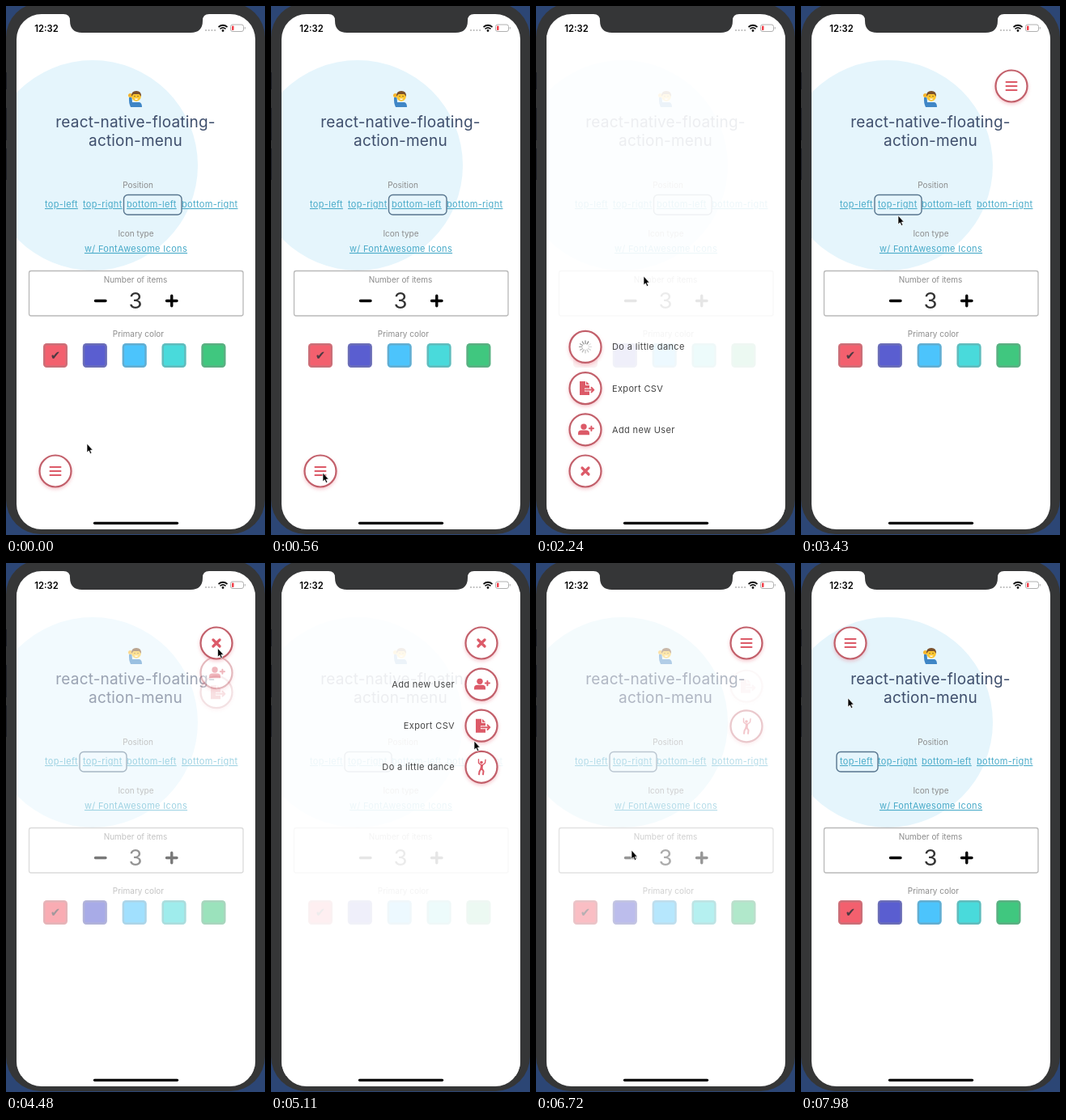
These frames come from a looping animation (320 px wide and 654 px high, 8000 ms). An HTML page:

```html
<!DOCTYPE html>
<html lang="en">
<head>
<meta charset="utf-8">
<title>Floating action menu</title>
<style>
html, body { margin: 0; width: 100%; height: 100%; overflow: hidden; background: #2c4675; }
svg { display: block; width: 100%; height: 100%; font-family: Inter, Roboto, sans-serif; }
.mid { text-anchor: middle; }
.cap { font-size: 10px; fill: #8c8c8c; }
.link { font-size: 11px; letter-spacing: .33px; fill: #4aabc9; text-decoration: underline; }
.label { font-size: 11px; letter-spacing: .35px; fill: #444; }
.title { font-size: 19px; letter-spacing: .18px; fill: #3e4e6c; }
.disc { fill: #fff; stroke: #c25f6a; stroke-width: 2.2; filter: drop-shadow(0 2px 2px #e8788866); }
.icon { fill: #dc5a68; stroke: #dc5a68; stroke-width: 0; stroke-linecap: round; stroke-linejoin: round; }
.line { fill: none; stroke-width: 2; }
</style>
</head>
<body>
<svg viewBox="0 0 320 654" preserveAspectRatio="none">
  <defs>
    <clipPath id="screen"><rect x="13" y="10" width="295" height="637" rx="31"/></clipPath>
    <g id="user">
      <circle cx="-2" cy="-3.7" r="3.7"/>
      <path d="M-9 6.5V4.5Q-9 .8-5 .8H1Q5 .8 5 4.5V6.5Z"/>
      <path class="line" d="M4.8-1.5H10M7.4-4.1V1.1"/>
    </g>
    <g id="export">
      <path d="M-7-8.5H0V-3.5H5V0H-1V4H5V8.5H-7Z"/>
      <path d="M1-8.5L5-4.5H1Z"/>
      <path class="line" d="M0 2H10M7.5-.8L10.3 2 7.5 4.8"/>
    </g>
    <g id="dance">
      <circle cx="0" cy="-5.8" r="1.8"/>
      <path class="line" style="stroke-width:1.4" d="M-3.5-9.5L-3.5-5-.5-2.5M1.500-2.500L4.500-5 5-9"/>
      <path class="line" style="stroke-width:3" d="M.5-2L0 2"/>
      <path class="line" style="stroke-width:2" d="M-.5 2L-2.500 5.500-3 9M.5 2L2.500 5 2 9"/>
    </g>
  </defs>

  <rect y="-4" width="320" height="657" rx="43" fill="#353637"/>
  <path d="M.5 82V103M.5 126V166M.5 176V215" stroke="#1c1f26"/>
  <g clip-path="url(#screen)">
    <rect x="13" y="10" width="295" height="637" fill="#fff"/>
    <circle cx="107" cy="197" r="130" fill="#e5f5fc"/>

    <g id="emoji">
      <path d="M152 113H155.500L156 119H165Q168 120 168 125H154Q151.500 120 152 113Z" fill="#3f86c6"/>
      <circle cx="153.500" cy="110.500" r="2.500" fill="#f7b52c"/>
      <circle cx="161" cy="112" r="5.800" fill="#fcc52f"/>
      <path d="M155 112Q154.500 105 161 105T167 112L164.500 109H157.500Z" fill="#7b512c"/>
      <path d="M158.500 114.500Q161 117.500 163.500 114.500Z" fill="#fff"/>
      <path d="M159 111V112M163 111V112" stroke="#5a4030" stroke-width="1.200"/>
    </g>
    <text class="mid title" x="160" y="150">react-native-floating-</text>
    <text class="mid title" x="160" y="173">action-menu</text>

    <text class="mid cap" x="163" y="225">Position</text>
    <text class="link" x="48" y="249">top-left</text>
    <text class="link" x="95" y="249">top-right</text>
    <text class="link" x="149" y="249">bottom-left</text>
    <text class="link" x="217" y="249">bottom-right</text>
    <rect id="pick" y="233.500" height="24.500" rx="5" fill="none" stroke="#58768f" stroke-width="1.400"/>
    <text class="mid cap" x="160.500" y="284.500">Icon type</text>
    <text class="mid link" x="160.500" y="304">w/ FontAwesome Icons</text>

    <rect x="28.500" y="327.500" width="264.500" height="55.500" rx="2.500" fill="#fff" stroke="#b9b9b9" stroke-width="1.300"/>
    <text class="mid cap" x="160" y="341.500">Number of items</text>
    <text class="mid" x="160" y="374" font-size="27.500" fill="#333">3</text>
    <path d="M110.500 364.500H123M198.500 364.500H211M204.750 358.200V370.800" stroke="#000" stroke-width="3.400" stroke-linecap="round"/>
    <text class="mid cap" x="163.500" y="409">Primary color</text>
    <g id="swatches"></g>
    <text class="mid" x="61" y="437" font-size="15" font-family="DejaVu Sans, sans-serif" fill="#4c3a42">✔</text>

    <rect id="veil" x="13" y="36" width="295" height="598" fill="#fff"/>
    <g id="menu"></g>

    <path d="M109.500 639.300H211.500" stroke="#000" stroke-width="3.200" stroke-linecap="round"/>
  </g>

  <path d="M71 9V10Q79 10 79 18Q79 33 94 33H228Q243 33 243 18Q243 10 251 10V9Z" fill="#353637"/>
  <text x="35.300" y="31.500" font-size="11.200" font-weight="600">12:32</text>
  <path d="M247 30H259" stroke="#b5b5b5" stroke-width="2" stroke-linecap="round" stroke-dasharray="0 3.700"/>
  <g fill="none" stroke="#111" stroke-width="1.700">
    <path d="M262.500 26Q268 21.500 273.500 26M264.500 28.300Q268 25.500 271.500 28.300"/>
    <circle cx="268" cy="30.500" r=".6"/>
  </g>
  <rect x="277.500" y="23" width="16" height="8.500" rx="2.500" fill="none" stroke="#b0b0b0"/>
  <path d="M295.300 26V28.500" stroke="#b0b0b0"/>
  <rect x="279" y="24.500" width="2.500" height="5.500" rx=".8" fill="#f0404a"/>

  <path id="cursor" d="M0 0V11L2.400 8.800 4 12.600 5.800 11.800 4.200 8.100H7.300Z" fill="#000" stroke="#fff" stroke-width=".7"/>
</svg>
<script>
const $ = id => document.getElementById(id);
const clamp = v => Math.min(1, Math.max(0, v));
const smooth = v => (v = clamp(v)) * v * (3 - 2 * v);

$('swatches').innerHTML = ['#f3606e', '#5a5ed0', '#4cc4fc', '#49dadb', '#40c77f'].map((c, i) =>
  `<g transform="translate(${46 + i * 48.85} 417)"><rect width="30" height="30" rx="4.5" fill="${c}"/>
   <rect x="1.2" y="1.2" width="27.6" height="27.6" rx="3.5" fill="none" stroke="#888" stroke-opacity=".38" stroke-width="2.4"/></g>`).join('');

// Menu: rows are added last item first so that the main button stays in front
const rows = [['Add new User', 'user'], ['Export CSV', 'export'], ['Do a little dance', 'dance']];
const spokes = Array.from({ length: 12 }, (_, i) =>
  `<path d="M0-4V-7.5" transform="rotate(${i * 30})" opacity="${.2 + i * .065}"/>`).join('');
$('menu').innerHTML = rows.map(([text, icon], i) =>
  `<g id="row${i}"><circle class="disc" r="19.5"/>
   <use class="icon" id="icon${i}" href="#${icon}"/><text class="label" id="label${i}" y="4">${text}</text></g>`).reverse().join('') +
  `<g id="main"><circle class="disc" r="19.5"/>
   <path class="icon line" id="bars" d="M-6.5-5H6.5M-6.5 0H6.5M-6.5 5H6.5"/>
   <path class="icon" id="cross" d="M-4-4L4 4M4-4L-4 4" style="stroke-width:3.2"/></g>`;
$('row2').insertAdjacentHTML('beforeend',
  `<g id="spinner" stroke="#777" stroke-width="1.2" stroke-linecap="round">${spokes}</g>`);

const places = [
  { from: 0, x: 61, y: 575, dir: -1, pick: [145.5, 71.5] },
  { from: 3100, x: 260, y: 99, dir: 1, pick: [91, 58] },
  { from: 7250, x: 61, y: 99, dir: 1, pick: [44, 51] }
];
const sessions = [{ open: 700, tap: 1660, close: 2660 }, { open: 4300, tap: 5564, close: 6564 }];

// Cursor stops: time, x, y
const stops = [
  [0, 100, 541], [180, 100, 541], [500, 64, 577], [740, 64, 577], [1050, 206, 378], [1200, 198, 384],
  [1500, 66, 424], [1700, 66, 424], [2240, 133, 334], [2800, 121, 250], [3150, 121, 250], [3430, 120, 259],
  [4050, 262, 101], [4400, 262, 101], [5110, 251, 220], [5400, 262, 256], [5600, 262, 256],
  [6020, 255, 296], [6720, 118, 355], [7100, 68, 248], [7350, 68, 248], [7980, 58, 167], [8000, 58, 167]
];

function spring(ms) {
  if (ms <= 0) return 0;
  const x = ms * .00785;
  return 1 - Math.exp(-.95 * x) * (Math.cos(x) + .95 * Math.sin(x));
}

const move = (id, x, y) => $(id).setAttribute('transform', `translate(${x} ${y})`);
const show = (id, amount) => $(id).setAttribute('opacity', +amount);

function draw(t) {
  const place = places.findLast(p => t >= p.from);
  const session = sessions.findLast(s => t >= s.open);
  const isOpen = !!session && t < session.close;
  const spinning = isOpen && t >= session.tap;
  const left = place.x < 160;

  const veil = !session ? 0 : isOpen ? smooth((t - session.open) / 350) : 1 - smooth((t - session.close) / 400);
  show('veil', .9 * veil);
  $('pick').setAttribute('x', place.pick[0]);
  $('pick').setAttribute('width', place.pick[1]);

  move('main', place.x, place.y);
  show('bars', !isOpen);
  show('cross', isOpen);

  rows.forEach((_, i) => {
    const p = !session ? 0 : isOpen ? spring(t - session.open - i * 30) : 1 - spring(t - session.close - i * 30);
    move('row' + i, place.x, place.y + place.dir * 51.2 * (i + 1) * p);
    show('row' + i, clamp(2 * p - 1));
    show('label' + i, clamp(4 * p - 3));
    const label = $('label' + i);
    label.setAttribute('x', left ? 33 : -33);
    label.setAttribute('text-anchor', left ? 'start' : 'end');
  });
  show('icon2', !spinning);
  show('spinner', spinning);
  $('spinner').setAttribute('transform', `rotate(${Math.floor(t / 83.3) * 30})`);

  const k = stops.findIndex(s => s[0] > t);
  const [t0, x0, y0] = stops[k - 1], [t1, x1, y1] = stops[k];
  const u = smooth((t - t0) / (t1 - t0));
  move('cursor', x0 + (x1 - x0) * u, y0 + (y1 - y0) * u);
}

const start = performance.now();
function tick() {
  draw((performance.now() - start) % 8000);
  requestAnimationFrame(tick);
}
tick();
</script>
</body>
</html>
```
